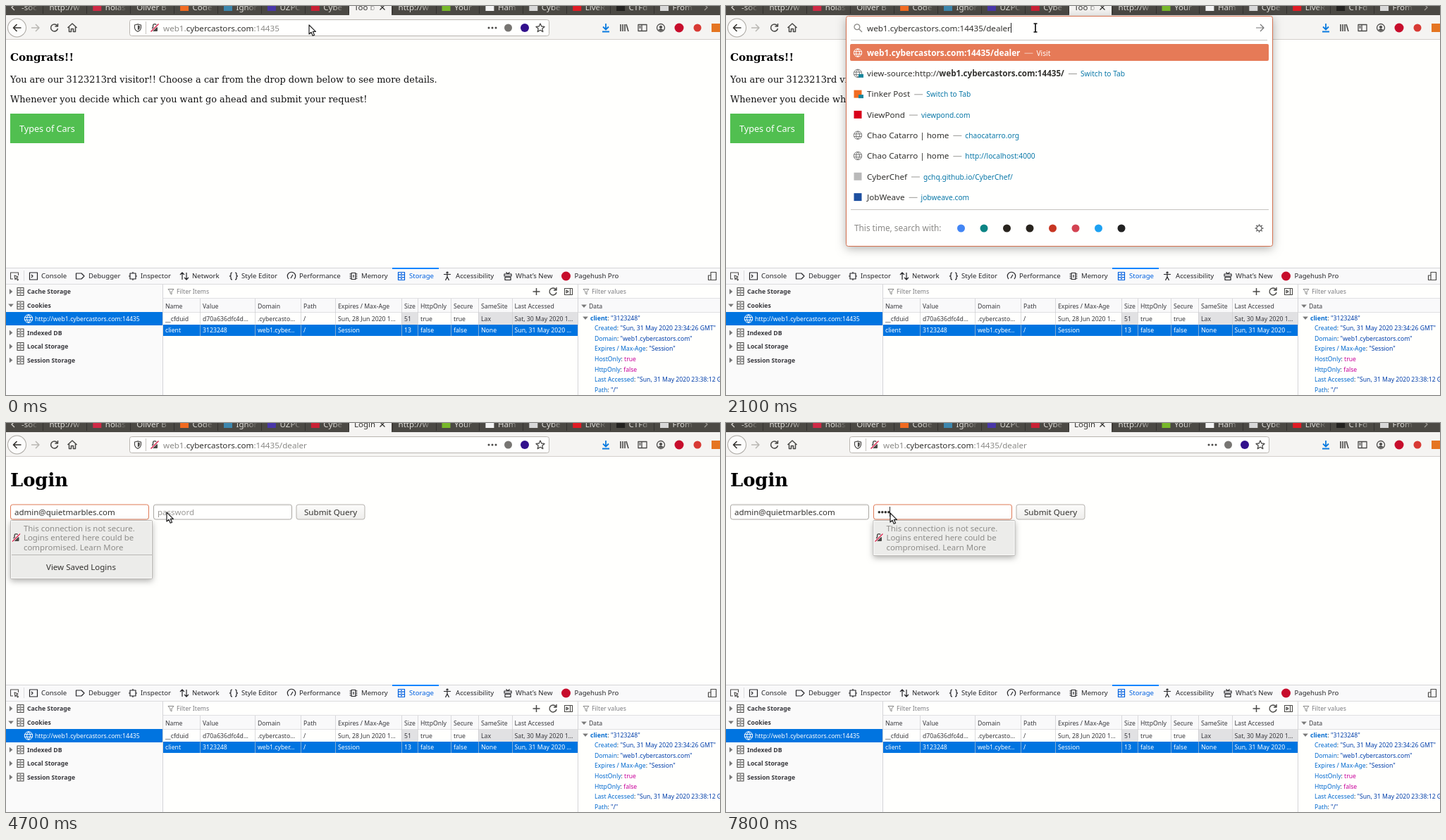
Recreate the animation shown at these times as an HTML page with a canvas. Size 1013 by 553 pixels, loop 8 s.

```html
<!DOCTYPE html>
<html lang="en">
<head>
<meta charset="utf-8">
<title>Browser login</title>
<style>
  html, body { margin: 0; width: 100%; height: 100%; overflow: hidden; background: #fffffd; }
  canvas { display: block; }
</style>
</head>
<body>
<canvas id="stage" width="1013" height="553"></canvas>
<script>
const g = document.getElementById('stage').getContext('2d');
const LOOP = 8000;
const SANS = '"Noto Sans", sans-serif', SERIF = '"DejaVu Serif", serif';
const INK = '#33322f', ICON = '#4a4947', GREY = '#8b8a87', BAR = '#f5f4f2', PAPER = '#fffffd';
const ORANGE = '#e67a57', LINK = '#0a78a8', TABS = '#4b4944', BLUE = '#0074e0';
const HOST = 'web1.cybercastors.com:14435', EMAIL = 'admin@quietmarbles.com';

// ---------- drawing helpers ----------
function text(s, x, y, size = 11.65, color = INK, weight = 400, family = SANS) {
  g.font = `${weight} ${size}px ${family}`;
  g.fillStyle = color;
  g.fillText(s, x, y);
  return x + g.measureText(s).width;
}
function rect(x, y, w, h, color) {
  g.fillStyle = color;
  g.fillRect(x, y, w, h);
}
function box(x, y, w, h, r, fill, stroke, shadow) {
  g.save();
  g.beginPath();
  g.roundRect(x, y, w, h, r);
  if (shadow) { g.shadowColor = 'rgba(0,0,0,.32)'; g.shadowBlur = shadow; g.shadowOffsetY = 3; }
  g.fillStyle = fill;
  g.fill();
  g.restore();
  if (stroke) { g.strokeStyle = stroke; g.lineWidth = 1; g.stroke(); }
}
function disc(x, y, r, color) {
  g.beginPath();
  g.arc(x, y, r, 0, 7);
  g.fillStyle = color;
  g.fill();
}
const square = (x, y, size, color) => rect(x - size / 2, y - size / 2, size, size, color);
function icon(x, y, d, color = ICON, width = 1.3, fill) {
  const path = new Path2D(d);
  g.save();
  g.translate(x, y);
  if (fill) { g.fillStyle = fill; g.fill(path); }
  g.strokeStyle = color;
  g.lineWidth = width;
  g.lineJoin = 'round';
  g.stroke(path);
  g.restore();
}
const shape = (x, y, d, color) => icon(x, y, d, color, .3, color);
// Latest value whose start time has passed.
const at = (t, steps) => steps.reduce((v, [start, next]) => t >= start ? next : v, undefined);

const P = {
  left: 'M6 0H-5M0-5L-5 0L0 5', right: 'M-6 0H5M0-5L5 0L0 5',
  reload: 'M4.4-2.6A5 5 0 1 0 5 1M5-6V-2H1', stop: 'M-5-5L5 5M5-5L-5 5',
  home: 'M-6.5 0L0-6L6.5 0M-4.5-1V5.5H-1.5V1.5H1.5V5.5H4.5V-1',
  shield: 'M0-5.2L4.5-4V0Q4 3.5 0 5.5Q-4 3.5-4.5 0V-4Z',
  star: 'M0-6L1.8-2L6-1.6L2.8 1.3L3.8 5.6L0 3.3L-3.8 5.6L-2.8 1.3L-6-1.6L-1.8-2Z',
  glass: 'M-5-1.2A3.9 3.9 0 1 0 2.8-1.2A3.9 3.9 0 1 0-5-1.2M1.7 1.7L6 6',
  globe: 'M-5.7 0A5.7 5.7 0 1 0 5.7 0A5.7 5.7 0 1 0-5.7 0M-5.5-1.8H5.5M-5.5 1.8H5.5M0-5.7Q-5 0 0 5.7M0-5.7Q5 0 0 5.7',
  gear: 'M-3.6 0A3.6 3.6 0 1 0 3.6 0A3.6 3.6 0 1 0-3.6 0M0-6V-3.6M0 6V3.6M-6 0H-3.6M6 0H3.6M-4.3-4.3L-2.5-2.5M4.3 4.3L2.5 2.5M-4.3 4.3L-2.5 2.5M4.3-4.3L2.5-2.5',
  db: 'M-4.5-5.5H4.5V5.5H-4.5ZM-4.5-1.8H4.5M-4.5 1.8H4.5M-1-3.7H1M-1 0H1M-1 3.7H1',
  funnel: 'M-4-3.5H4L1 0V4L-1 2.5V0Z',
  arrow: 'M0 0V13L3 10.2L5.2 15.2L7.6 14.2L5.4 9.4H9.4Z'
};

function slashedLock(x, y) {
  icon(x, y, 'M-2.4-1V-3A2.4 2.4 0 0 1 2.4-3V-1', ICON, 1.4);
  box(x - 4, y - 1, 8, 6, 1, ICON);
  icon(x, y, 'M-5.5 5.5L5.5-5.5', PAPER, 3);
  icon(x, y, 'M-5.5 5.5L5.5-5.5', '#d7264f', 1.5);
}
const caret = (x, y) => rect(Math.round(x), y, 1, 14, '#222');

// ---------- browser chrome ----------
const tabs = [
  ['http://w'], ['holas', '#cf2945'], ['Oliver B'], ['Code', '#f26b21'], ['Ignor', '#3d87ad'],
  ['UZPC', '#4936a8'], ['Cybe', '#c92034'], [''], ['http://w'], ['Your', '#77b82a'], ['Ham', '#f4f4f4'],
  ['Cybe', '#d8d8d8'], ['LiveR', '#e01b24'], ['CTFd', '#22211f'], ['From', '#d8d8d8']
];

function fade(x, color) {
  const gradient = g.createLinearGradient(x, 0, x + 16, 0);
  gradient.addColorStop(0, color + '00');
  gradient.addColorStop(1, color);
  rect(x, 0, 20, 13, gradient);
}

function drawTabs(t, loading, login) {
  rect(0, 0, 1013, 14, TABS);
  text('-soc', 22, 6, 11.5, '#d8d6d1');
  fade(30, TABS);
  tabs.forEach(([label, color], i) => {
    const x = 52.4 + 61.9 * i;
    if (i === 7) {
      rect(487, 0, 60, 14, BAR);
      if (loading) disc(497 + 7 * Math.abs(Math.sin(Math.floor(t / 100) * .7 + .9)), 2, 2, '#8d8c8a');
      text(login ? 'Login' : 'Too b', loading ? 512 : 494, 6, 11.5, loading ? '#9b9a97' : INK);
      if (!login || loading) fade(511, BAR);
      icon(534, 2, 'M-3.5-3.5L3.5 3.5M3.5-3.5L-3.5 3.5', INK);
    } else {
      if (color) square(x + 15, 1, 12, color);
      text(label, x + (color ? 26.5 : 9), 6, 11.5, '#e0deda');
      fade(x + 41, TABS);
    }
    rect(Math.round(x), 0, 1, 11, '#33312e');
  });
  rect(980, 0, 33, 13, TABS);
  icon(10, 2, 'M2-4L-2 0L2 4', '#d8d6d1');
  icon(993, 2, 'M-2-4L2 0L-2 4', '#9a9892');
}

function pageActions(compact) {
  const shift = compact ? 22.5 : 0;
  for (const dx of [-5, 0, 5]) disc(690 + dx + shift, 31, 1.5, ICON);
  disc(712.5 + shift, 31, 5.5, '#777572');
  if (!compact) disc(736, 31, 6, '#32108c');
  icon(758, 31, P.star);
}

function drawToolbar(reloading, compact, path) {
  rect(0, 13, 1013, 34, BAR);
  rect(0, 47, 1013, 1, '#d3d0cc');
  disc(15.5, 31, 13.5, '#aaa7a2');
  disc(15.5, 31, 12.5, '#fcfcfb');
  icon(15.5, 31, P.left, INK, 1.6);
  icon(42, 31, P.right, '#b9b7b3', 1.5);
  icon(68.5, 31, reloading ? P.stop : P.reload, ICON, 1.5);
  icon(94, 31, P.home, ICON, 1.5);
  box(175.5, 19.5, 595, 23, 3, '#fffffe', '#b9b5b0');
  siteIcons();
  let x = text('web1.', 223, 35.5, 11.65, GREY);
  x = text('cybercastors.com', x, 35.5);
  text(':14435' + path, x, 35.5, 11.65, GREY);
  pageActions(compact);

  icon(851, 31, 'M0-6V2M-4-1.5L0 2.5L4-1.5M-5 5.5H5', '#0a7be0', 1.8);
  icon(877, 31, 'M-5-5V5M-2-5V5M1-5V5M3-5L6 5', ICON, 1.6);
  icon(903, 31, 'M-6-4.5H6V4.5H-6ZM-1-4.5V4.5M-4.5-2H-2.5M-4.5 0H-2.5');
  icon(929, 31, 'M-5.5 0A5.5 5.5 0 1 0 5.5 0A5.5 5.5 0 1 0-5.5 0');
  shape(929, 31, 'M-2-1A2 2 0 1 1 2-1A2 2 0 1 1-2-1M-3.7 3Q0 0 3.7 3Q0 5.5-3.7 3Z', ICON);
  disc(955, 31, 6.5, '#c70d2c');
  disc(981, 31, 5.5, '#d83a34');
  square(1007, 31, 12, '#e57521');
}

function siteIcons() {
  icon(187, 31, P.shield, ICON, 1.2);
  icon(187, 31, 'M0-3.4V3.4Q2.7 2 2.8 0V-2.7Z', ICON, .2, ICON);
  rect(198, 22, 1, 18, '#c9c6c2');
  slashedLock(211, 31);
}

// ---------- address popup ----------
const suggestions = [
  ['Search with Orvada.fr', '', '#29241e'], ['Search with Quiblo', '', '#4285f4'],
  ['Tinker Post', 'Switch to Tab', '#f26b21'], ['ViewPond', 'viewpond.com', '#d9001b'],
  ['Chao Catarro | home', 'chaocatarro.org'], ['Chao Catarro | home', 'http://localhost:4000'],
  ['CyberChef', 'gchq.github.io/CyberChef/', '#b9b9b9'], ['JobWeave', 'jobweave.com', '#1d4f9f']
];
const engines = ['#4285f4', '#0c8484', '#29241e', '#29241e', '#c73622', '#d34352', '#1da1f2', '#222'];

function linkAfter(x, y, label, color = LINK) {
  rect(x + 6, y - 4, 12, 1, color === LINK ? '#9a9996' : '#f4cabd');
  text(label, x + 23, y, 10.2, color);
}
const tabBadge = y => rect(188, y + 1, 7, 5, '#16859b');

function drawPopup(t, path) {
  box(170.5, 14.5, 605, path ? 327 : 274, 3, '#fffffe', '#d5714f', t < 700 ? 0 : 14);
  rect(177, 48, 591, 1, '#c5c3bf');
  if (path) {
    icon(187, 31, P.glass, GREY);
    icon(758, 31, P.right, '#777', 1.2);
    caret(text(HOST + path, 200, 35.5), 24);
  } else {
    siteIcons();
    pageActions(false);
    const selected = t < 1200;
    if (selected) {
      g.font = `400 11.65px ${SANS}`;
      rect(223, 24, g.measureText(HOST).width, 15, ORANGE);
    }
    const end = text(HOST, 223, 35.5, 11.65, selected ? '#fff' : INK);
    if (!selected) caret(end, 24);
  }
  suggestions.forEach(([title, link, color], i) => {
    const y = 66.5 + 29.3 * i, base = y + 4.2;
    if (path && i === 0) {
      box(176, 54, 594, 24, 2, ORANGE);
      icon(187, y, P.globe, '#fff', 1);
      linkAfter(text(HOST + path, 200, base, 11.8, '#fff', 700), base, 'Visit', '#fff');
    } else if (path && i === 1) {
      icon(187, y, P.globe, '#777', 1);
      tabBadge(y);
      const x = text('view-source:http://', 200, base);
      linkAfter(text(HOST + '/', x, base, 11.65, INK, 700), base, 'Switch to Tab');
    } else {
      if (color) square(187, y, 11, color);
      else icon(187, y, P.globe, '#777', 1);
      if (i === 2) tabBadge(y);
      const end = text(title, 200, base);
      if (link) linkAfter(end, base, link);
    }
  });
  if (path) {
    rect(177, 289, 593, 1, '#c5c3bf');
    text('This time, search with:', 182, 320, 11.8, GREY);
    engines.forEach((color, i) => disc(333.5 + 32.5 * i, 316, 5.5, color));
    icon(756.5, 316, P.gear, '#666');
  }
}

// ---------- pages ----------
function drawCarPage() {
  text('Congrats!!', 6, 78, 15.1, '#000', 700, SERIF);
  text('You are our 3123213rd visitor!! Choose a car from the drop down below to see more details.', 6, 108.5, 12.9, '#111', 400, SERIF);
  text('Whenever you decide which car you want go ahead and submit your request!', 6, 137, 12.9, '#111', 400, SERIF);
  rect(6, 153, 105, 42, '#51bf50');
  text('Types of Cars', 19, 179, 12.6, '#fff');
}

function field(x, focused) {
  box(x + .5, 116, 196, 21, 3, '#fffffe', focused ? '#df7b57' : '#aaa7a2');
  if (!focused) rect(x + 3, 116.5, 191, 1, '#dedcd9');
}

function loginHint(x, tall) {
  box(x + .5, 138.5, 201, tall ? 83 : 50, 1, '#ececea', '#bbb9b6', 9);
  g.strokeStyle = '#fafaf9';
  g.strokeRect(x + 1.5, 139.5, 199, tall ? 81 : 48);
  slashedLock(x + 8.5, 163);
  ['This connection is not secure.', 'Logins entered here could be', 'compromised. Learn More']
    .forEach((line, i) => text(line, x + 19, 153.5 + 13.9 * i, 11.4, '#8d8c89'));
  if (tall) {
    rect(x + 2, 187, 199, 1, '#b9b7b4');
    text('View Saved Logins', x + 51, 209, 11.5, INK);
  }
}

function drawLoginPage(t) {
  const onEmail = t >= 3500 && t < 4900, onPassword = t >= 4900;
  const dots = at(t, [[0, 0], [5500, 2], [5600, 3], [6000, 4], [6700, 3], [6900, 1],
    [7100, 0], [7200, 1], [7300, 2], [7400, 3], [7500, 4]]);
  text('Login', 6, 90, 25.8, '#000', 700, SERIF);
  field(6, onEmail);
  field(209, onPassword);
  const button = g.createLinearGradient(0, 116, 0, 137);
  button.addColorStop(0, '#fcfcfb');
  button.addColorStop(1, '#eeedeb');
  box(412, 116, 97, 21, 3, button, '#b5b2ad');
  text('Submit Query', 423, 131, 11.6);

  const filled = t >= 4100;
  const end = text(filled ? EMAIL : 'email', 12, 131, 11.5, filled ? INK : '#9a9996');
  if (onEmail && t < 4500) caret(filled ? end : 12, 119);
  if (!dots) text('password', 215, 131, 11.5, '#9a9996');
  for (let i = 0; i < dots; i++) disc(217.3 + 4.5 * i, 126.8, 1.75, INK);
  const caretOn = at(t, [[0, true], [6100, false], [6700, true], [7500, false], [7800, true]]);
  if (onPassword && caretOn) caret(214.3 + 4.5 * dots, 119);
  if (onEmail) loginHint(6, true);
  if (onPassword) loginHint(208.5, t >= 7100 && t < 7200);
}

function drawStatus(message) {
  box(-3.5, 355.5, 274, 20, 3, '#f1f0ee', '#c4c1bd');
  text(message, 2.5, 369, 11.55);
}

// ---------- developer tools ----------
const tools = [
  [39, 50, 'Console', 'M-5.5-5H5.5V5H-5.5ZM-3-2L-1 0L-3 2'],
  [105, 117, 'Debugger', 'M-5.5-4H2L6 0L2 4H-5.5Z'],
  [180, 191, 'Inspector', 'M-4-4H4V4H-4ZM0-6V-4M0 6V4M-6 0H-4M6 0H4'],
  [253, 264, 'Network', 'M-3 5V-5M-6-2L-3-5L0-2M3-5V5M0 2L3 5L6 2'],
  [323, 334, 'Style Editor', 'M-2-5Q-4-5-4-3V-1L-5.5 0L-4 1V3Q-4 5-2 5M2-5Q4-5 4-3V-1L5.5 0L4 1V3Q4 5 2 5'],
  [405, 416, 'Performance', 'M-4 4A5.7 5.7 0 1 1 4 4M-1 3L2-2'],
  [493, 504, 'Memory', 'M-3-4.5H3V4.5H-3ZM-5.5-3H-3M-5.5 0H-3M-5.5 3H-3M5.5-3H3M5.5 0H3M5.5 3H3M0-2V2'],
  [561, 572, 'Storage', P.db],
  [626, 638, 'Accessibility', 'M-5-2.5H5M0-2.5V1L-2.5 6M0 1L2.5 6M-1-5A1 1 0 1 1 1-5A1 1 0 1 1-1-5'],
  [712, 723, 'What’s New', 'M-5-3H5V0H-5ZM-4 1.5H4V5.5H-4ZM0-3L-2.5-5.5M0-3L2.5-5.5']
];
const columns = [
  [226, 'Name', '__cfduid', 'client'], [279, 'Value', 'd70a636dfc4d…', '3123248'],
  [357, 'Domain', '.cybercasto…', 'web1.cyber…'], [422, 'Path', '/', '/'],
  [471, 'Expires / Max-Age', 'Sun, 28 Jun 2020 1…', 'Session'], [565, 'Size', '51', '13'],
  [588, 'HttpOnly', 'true', 'false'], [635, 'Secure', 'true', 'false'],
  [674, 'SameSite', 'Lax', 'None'], [721.5, 'Last Accessed', 'Sat, 30 May 2020 1…', 'Sun, 31 May 2020 …']
];
const details = [
  ['Created', '"Sun, 31 May 2020 23:34:26 GMT"'], ['Domain', '"web1.cybercastors.com"'],
  ['Expires / Max-Age', '"Session"'], ['HostOnly', 'true'], ['HttpOnly', 'false'],
  ['Last Accessed', '"Sun, 31 May 2020 23:38:12 GMT"'], ['Path', '"/"']
];
const twistyDown = (x, y) => shape(x, y, 'M-3.5-1.8H3.5L0 2.2Z', '#777');

function drawDevtools() {
  rect(0, 372, 1013, 181, PAPER);
  rect(0, 372, 1013, 24, '#f9f9fa');
  rect(0, 372, 1013, 1, '#d5d5d8');
  rect(0, 395, 1013, 1, '#dcdcde');
  rect(548, 372, 66, 2, '#0a84ff');
  icon(12, 384, 'M-2 4H-5.5V-5H5.5V-1M0-1L5 1L3 2L5.5 5L4.5 6L2 3L1 5Z', ICON, 1.1);
  rect(25, 376, 1, 15, '#dcdcde');
  for (const [ix, x, label, d] of tools) {
    const color = label === 'Storage' ? '#0060df' : '#252528';
    icon(ix, 384, d, color, 1.2);
    text(label, x, 387, 9.6, color);
  }
  disc(794.5, 384, 6.5, '#c70d2c');
  text('Pagehush Pro', 806.5, 387, 9.6, '#252528');
  icon(1002, 384, 'M-2-5.5H5.5V5.5H-2ZM-2-1H-5.5V5.5H-2', ICON, 1.2);

  rect(0, 396, 222, 157, '#fafafa');
  rect(0, 435, 222, 19, BLUE);
  icon(32, 444.5, P.globe, '#fff', 1);
  text('http://' + HOST, 41, 448, 8.7, '#fff');
  ['Cache Storage', 'Cookies', '', 'Indexed DB', 'Local Storage', 'Session Storage'].forEach((label, i) => {
    if (!label) return;
    const y = 406 + 19.5 * i;
    if (i === 1) twistyDown(7, y);
    else shape(7, y, 'M-2-3.5V3.5L2.2 0Z', '#777');
    icon(20.5, y, P.db, ICON, 1.1);
    text(label, 30, y + 3.2, 8.7, '#38383d', 700);
  });

  icon(234, 406, P.funnel, '#888', 1);
  text('Filter Items', 242, 409, 8.7, '#7c7c80');
  icon(752.5, 406, 'M-5 0H5M0-5V5', ICON, 1.5);
  icon(776, 406, P.reload, ICON, 1.4);
  icon(798, 406, 'M-5.5-4.5H5.5V4.5H-5.5ZM2.5-4.5V4.5M-3-2L0 0L-3 2Z', ICON, 1.1);
  rect(223, 415, 790, 20, '#f9f9fa');
  rect(223, 415, 790, 1, '#e0e0e2');
  rect(223, 435, 790, 1, '#e0e0e2');
  rect(561, 436, 23, 17, '#e1e1e3');
  rect(670, 436, 141, 17, '#e1e1e3');
  rect(223, 453, 588, 16, BLUE);
  columns.forEach(([x, head, first, second], i) => {
    if (i) rect(Math.round(x - 4), 416, 1, 53, 'rgba(200,200,205,.65)');
    text(head, x, 429.5, 8.7, '#38383d');
    text(first, x, 447.5, 8.7, '#38383d');
    text(second, x, 464, 8.7, '#fff');
  });
  rect(222, 396, 1, 157, '#d5d5d8');
  rect(811, 396, 1, 157, '#d5d5d8');

  icon(823, 406, P.funnel, '#888', 1);
  text('Filter values', 831, 409, 8.7, '#7c7c80');
  twistyDown(820, 426.5);
  text('Data', 827, 429.5, 8.7, '#38383d');
  twistyDown(822, 443.5);
  let x = text('client', 829, 446.5, 8.7, '#0069cf', 700);
  x = text(': ', x, 446.5, 8.7, '#38383d');
  text('"3123248"', x, 446.5, 8.7, '#003eaa');
  details.forEach(([key, value], i) => {
    const y = 461 + 14.65 * i;
    const end = text(key, 835, y, 8.65, '#0069cf');
    text(value, text(': ', end, y, 8.65, '#38383d'), y, 8.65, value[0] === '"' ? '#003eaa' : '#c9009a');
  });
}

// ---------- pointer ----------
function drawPointer(t) {
  const [kind, x, y] = at(t, [
    [0, ['arrow', 430, 27]], [100, ['arrow', 432, 26]], [200, ['beam', 437, 30]], [300, ['beam', 439, 31]],
    [2800, ['beam', 390, 45]], [2900, ['arrow', 320, 74]], [3000, ['arrow', 245, 105]], [3100, ['arrow', 211, 118]],
    [3300, ['beam', 196, 127]], [4500, ['arrow', 184, 126]], [4700, ['arrow', 228, 127]], [4900, ['arrow', 233, 128]]
  ]);
  if (kind === 'arrow') return icon(x, y, P.arrow, '#222', 1.2, '#fff');
  const beam = 'M-2.5-6H2.5M0-6V6M-2.5 6H2.5';
  icon(x, y, beam, '#fff', 3.6);
  icon(x, y, beam, '#111', 1.7);
}

function draw(t) {
  const typed = [1400, 1500, 1600, 1800, 1900, 2000, 2100].filter(key => t >= key).length;
  const path = '/dealer'.slice(0, typed);
  const login = t >= 2600, loading = t >= 2300 && t < 2900;
  rect(0, 0, 1013, 553, PAPER);
  if (login) drawLoginPage(t); else drawCarPage();
  if (t >= 2400 && t < 3000) drawStatus(`${login ? 'Transferring data from' : 'Waiting for'} web1.cybercastors.com…`);
  drawTabs(t, loading, login);
  drawToolbar(t >= 2300 && t < 3300, t >= 2500 && t < 3700, t >= 2300 ? '/dealer' : '');
  drawDevtools();
  if (t >= 600 && t < 2300) drawPopup(t, path);
  drawPointer(t);
}

const start = performance.now();
function tick() {
  draw((performance.now() - start) % LOOP);
  requestAnimationFrame(tick);
}
tick();
</script>
</body>
</html>
```
